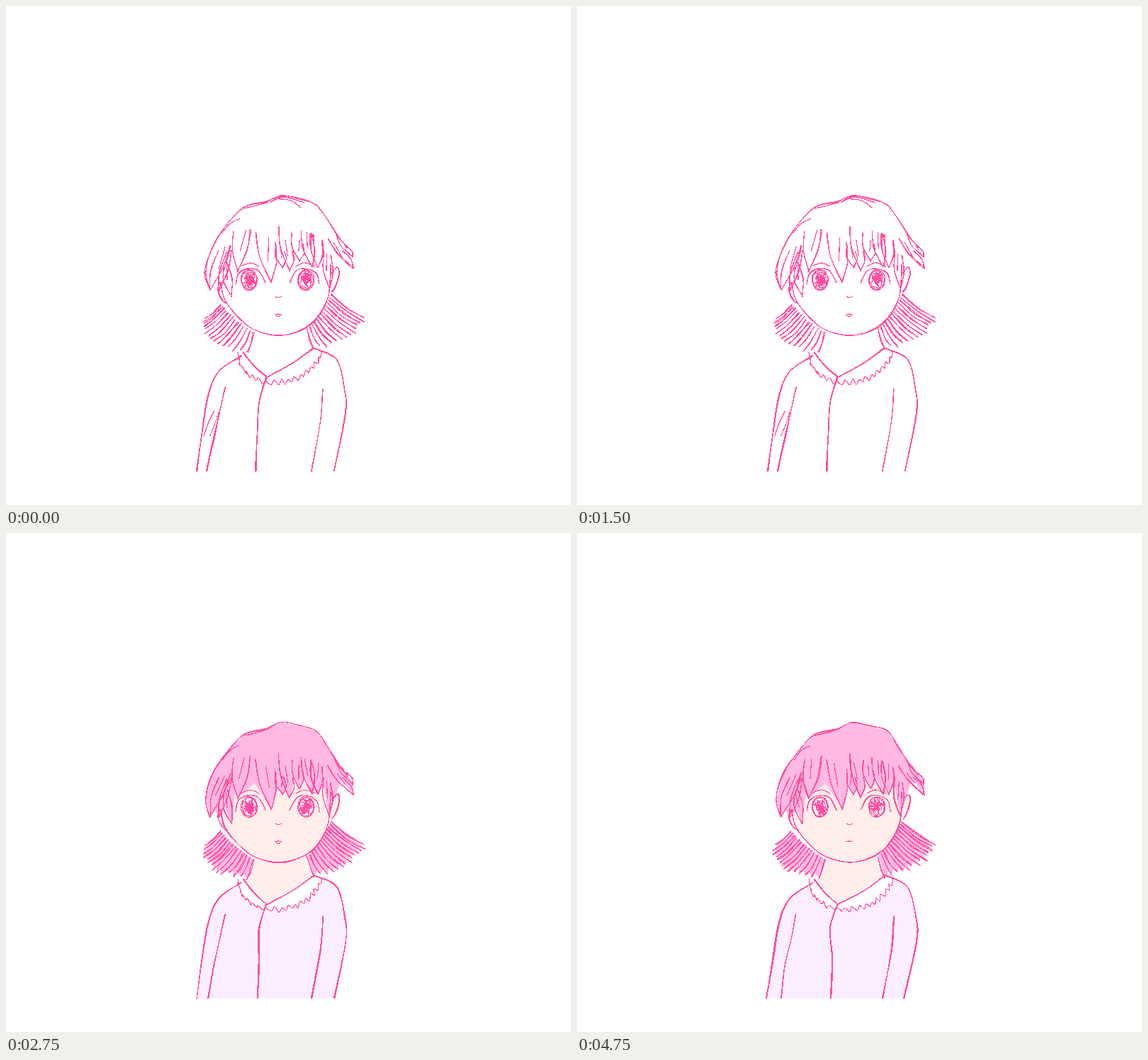
An HTML page for the animation above (5000 ms loop, 797 px wide and 703 px high).

```html
<!DOCTYPE html>
<html lang="en">
<head>
<meta charset="utf-8">
<title>Girl sketch</title>
<style>
  html, body { margin: 0; width: 100%; height: 100%; overflow: hidden; background: #fff; }
  svg { display: block; width: 797px; height: 703px; }
  .line { fill: none; stroke: #ff4c9f; stroke-width: 1.2; stroke-linecap: round; }
</style>
</head>
<body>
<svg viewBox="0 0 797 703" shape-rendering="crispEdges">
  <defs><clipPath id="page"><path d="M0 0H797V656H0Z"/></clipPath></defs>
  <g id="stage" clip-path="url(#page)"></g>
</svg>
<script>
const HAIR = '#ffb9e2', SKIN = '#ffeeea', COAT = '#fbeeff';
const PAGE_BOTTOM = 656;

// Key points of the figure, as x, y pairs.
const crown = pairs(288,400, 281,375, 291,340, 312,308, 336,283, 367,276, 388,267, 412,271, 437,279, 453,301, 470,327, 482,341);
const jaw = pairs(303,390, 309,415, 330,441, 352,456, 385,464, 418,456, 440,438, 455,408, 458,365);
const ears = [pairs(302,390, 299,400, 305,414, 312,419), pairs(460,376, 468,368, 470,378, 465,395, 460,403)];
const neck = pairs(350,450, 350,476, 337,488, 368,522, 434,482, 423,470, 423,450);
const collar = [pairs(335,488, 350,507, 368,523), pairs(368,523, 405,503, 434,482)];

// Each lock of the fringe, left to right: left root, tip, right root.
const locks = [
  pairs(300,345, 288,399, 316,338), pairs(312,347, 300,401, 318,345),
  pairs(307,368, 318,409, 312,362), pairs(321,318, 327,374, 345,315),
  pairs(352,319, 374,389, 380,333), pairs(381,338, 390,368, 392,345),
  pairs(385,311, 400,373, 404,345), pairs(404,320, 414,360, 418,335),
  pairs(416,317, 432,367, 431,322), pairs(430,320, 440,368, 446,330),
  pairs(448,345, 456,398, 458,352), pairs(454,328, 490,369, 475,345),
  pairs(466,322, 489,354, 480,338),
];

const poses = [
  { seed: 11, hems: [269, 283, 352, 431, 463], mouthOpen: true, creased: true },
  { seed: 29, hems: [267, 288, 358, 431, 461], mouthOpen: false, creased: false },
  { seed: 47, hems: [269, 285, 355, 431, 463], mouthOpen: true, creased: false },
];

function pairs(...n) {
  return Array.from({ length: n.length / 2 }, (_, i) => [n[2 * i], n[2 * i + 1]]);
}

function randomFrom(seed) {
  return () => (seed = (seed * 16807) % 2147483647) / 2147483647;
}

const range = n => Array.from({ length: n }, (_, i) => i);
const mix = (a, b, t) => a.map((v, k) => v + (b[k] - v) * t);
const bezier = ([a, b, c], t) => mix(mix(a, b, t), mix(b, c, t), t);
const mirror = points => points.map(([x, y]) => [766 - x, y]);

// Catmull-Rom spline through the points.
function smooth(points) {
  const at = i => points[Math.max(0, Math.min(points.length - 1, i))];
  const text = p => p.map(v => v.toFixed(1)).join();
  let d = 'M' + text(points[0]);
  for (let i = 0; i < points.length - 1; i++) {
    const [a, b, c, e] = [at(i - 1), at(i), at(i + 1), at(i + 2)];
    const c1 = b.map((v, k) => v + (c[k] - a[k]) / 6);
    const c2 = c.map((v, k) => v - (e[k] - b[k]) / 6);
    d += `C${text(c1)} ${text(c2)} ${text(c)}`;
  }
  return d;
}

const fill = (colour, ...curves) =>
  `<path fill="${colour}" d="${curves.map(smooth).join('').replace(/(?!^)M/g, 'L')}Z"/>`;
const fillSharp = (colour, points) => `<path fill="${colour}" d="M${points.join('L')}Z"/>`;

// Scalloped edge that swings to both sides of a curve.
const scallops = (curve, count) => range(count).map(i => {
  const [x, y] = bezier(curve, i / (count - 1));
  const swing = i % 2 ? 3 : -3;
  return [x + swing * 0.3, y + swing];
});

// Strands spreading from a curve of roots to a curve of tips.
const fan = (roots, tips, count, random) => range(count).map(i => {
  const t = i / (count - 1);
  const root = bezier(roots, t);
  const tip = mix(root, bezier(tips, t), 0.88 + random() * 0.16);
  const [x, y] = mix(root, tip, 0.5);
  return [root, [x, y + 3], tip];
});

const fanFill = strands => fillSharp(HAIR, [
  ...strands.flatMap(([root, , tip]) => [tip, mix(tip, root, 0.2)]),
  ...strands.map(s => s[0]).reverse(),
]);

// Lower edge of the fringe: the tips with a notch between neighbours.
const fringe = locks.flatMap(([, tip], i) => {
  if (!i) return [tip];
  const last = locks[i - 1][1];
  const depth = Math.min(22, Math.abs(tip[0] - last[0]) * 0.8);
  return [[(last[0] + tip[0]) / 2, Math.min(last[1], tip[1]) - depth], tip];
});

function drawing({ seed, hems, mouthOpen, creased }, coloured) {
  const random = randomFrom(seed);
  const shake = (points, amount) => points.map(p => p.map(v => v + (random() - 0.5) * 2 * amount));
  let lines = '';
  const pencil = (points, passes = 2, wobble = 0.7) => {
    for (let i = 0; i < passes; i++) lines += smooth(shake(points, wobble));
  };

  const hem = i => [hems[i], PAGE_BOTTOM];
  const leftArm = [...pairs(332,493, 300,515, 285,550, 276,603), hem(0)];
  const rightArm = [...pairs(434,482, 466,498, 478,540, 479,575), hem(4)];
  const frills = [scallops(pairs(328,490, 328,520, 367,530), 15), scallops(pairs(368,530, 425,535, 446,488), 21)];
  const tails = [
    fan(pairs(302,420, 318,440, 349,460), pairs(278,442, 270,478, 340,489), 14, random),
    fan(pairs(458,406, 448,432, 425,456), pairs(506,440, 500,470, 434,484), 14, random),
  ];

  // Hair
  pencil(crown, 2, 1);
  for (const [left, tip, right] of locks) {
    const side = (root, bulge) => {
      const [x, y] = mix(root, tip, 0.5);
      return [root, [x + bulge, y], tip];
    };
    pencil(side(left, -5), 2, 0.9);
    pencil(side(right, 4), 2, 0.9);
    pencil(side(mix(left, right, 0.3 + random() * 0.4), -1).slice(0, 2), 1, 2);
  }
  for (const strand of tails.flat()) pencil(strand, 2, 1.2);
  pencil(pairs(305,320, 316,306, 329,300), 1);
  pencil(pairs(336,285, 350,282, 370,276));
  if (creased) {
    pencil(pairs(372,276, 392,269, 420,277), 2, 1);
    pencil(pairs(376,271, 400,273, 416,284), 1);
  }

  // Face
  pencil(jaw, 2, 0.9);
  for (const ear of ears) pencil(ear);
  const lid = pairs(324,392, 328,377, 342,370, 356,373, 366,390);
  const brow = pairs(330,367, 345,362, 357,367);
  for (const flip of [p => p, mirror]) {
    pencil(flip(lid), 2, 0.5);
    pencil(flip(brow), 1, 0.3);
    const iris = (angle, r) => [343 + 11.5 * r * Math.cos(angle), 386 + 14.5 * r * Math.sin(angle)];
    for (const r of [1, 0.9]) pencil(flip(range(13).map(i => iris(i * Math.PI / 6, r))), 1, 0.5);
    pencil(flip(range(38).map(() => iris(random() * 2 * Math.PI, 0.85 * Math.sqrt(random())))), 1, 0);
  }
  pencil(pairs(380,409, 384,411, 389,409), 1, 0);
  pencil(pairs(379,435, 384,434, 389,435), 1, 0);
  if (mouthOpen) pencil(pairs(380,435, 384,438, 388,435), 1, 0);

  // Coat
  for (const edge of collar) pencil(edge, 3, 0.8);
  for (const frill of frills) pencil(frill, 1, 1.2);
  pencil(leftArm, 3, 0.8);
  pencil(rightArm, 3, 0.8);
  pencil([...pairs(309,537, 302,570, 293,610), hem(1)], 3);
  pencil([...pairs(447,540, 444,585), hem(3)], 3);
  pencil([...pairs(367,524, 357,558), [hems[2] + 2, 600], hem(2)], 4, 0.9);
  if (creased) {
    pencil(pairs(279,607, 286,588, 293,570), 1);
    pencil(pairs(288,605, 295,588, 300,572), 1);
  }

  const flats = !coloured ? '' :
    tails.map(fanFill).join('') +
    fill(COAT, leftArm, [...rightArm].reverse(), [...frills[1]].reverse(), [...frills[0]].reverse()) +
    fillSharp(SKIN, neck) +
    fill(SKIN, jaw, ears[1]) +
    fill(SKIN, jaw, pairs(455,340, 306,345)) +
    fillSharp(HAIR, [...crown, ...[...fringe].reverse()]) +
    '<g fill="#fff"><ellipse cx="343" cy="386" rx="11" ry="14"/><ellipse cx="423" cy="386" rx="11" ry="14"/></g>';
  return `${flats}<path class="line" d="${lines}"/>`;
}

const stage = document.getElementById('stage');
const cels = [false, true].map(coloured => poses.map(pose => {
  const cel = document.createElementNS('http://www.w3.org/2000/svg', 'g');
  cel.innerHTML = drawing(pose, coloured);
  cel.style.display = 'none';
  return stage.appendChild(cel);
}));

const colouredSteps = [3, 4, 5, 9, 10, 11, 19];
const start = performance.now();
let current = cels[0][0];
function show(now) {
  const step = Math.floor(Math.max(0, now - start) % 5000 / 250);
  current.style.display = 'none';
  current = cels[+colouredSteps.includes(step)][step % 3];
  current.style.display = '';
  requestAnimationFrame(show);
}
show(start);
</script>
</body>
</html>
```
